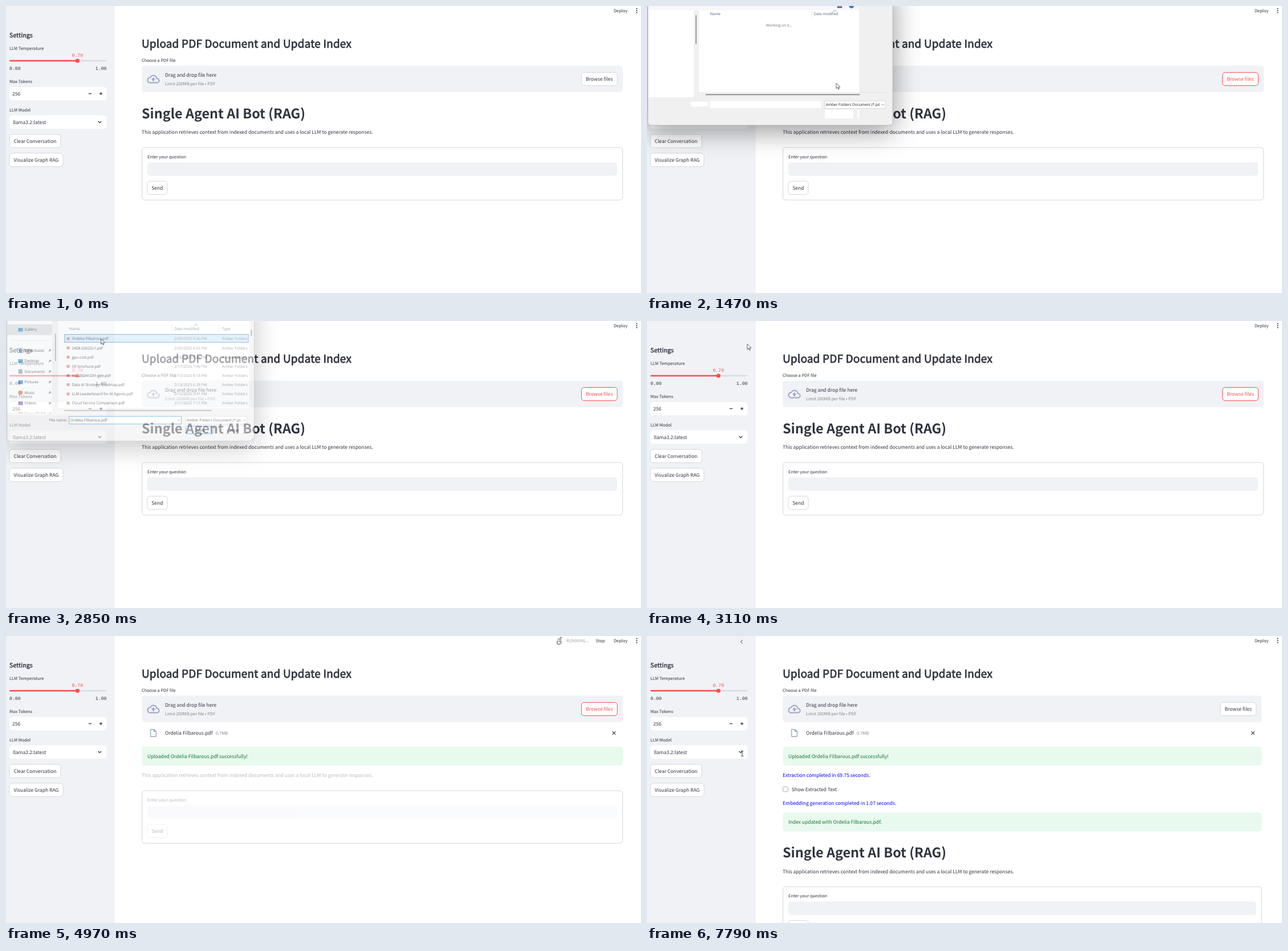
Recreate the animation shown at these times as an HTML page. Size 1114 px wide and 503 px high, loop 8 s.

```html
<!DOCTYPE html>
<html lang="en">
<head>
<meta charset="utf-8">
<title>Single Agent AI Bot</title>
<style>
html, body { margin: 0; width: 100%; height: 100%; overflow: hidden; background: #fff; }
svg { display: block; width: 1114px; height: 503px; }
text {
  font-family: "Noto Sans CJK JP", "Noto Sans CJK SC", "Noto Sans CJK", "Noto Sans CJK KR", "Open Sans", sans-serif;
  font-size: 8.5px; fill: #31333f; text-rendering: geometricPrecision; white-space: pre;
}
.s { font-size: 7.44px; }
.mid { text-anchor: middle; }
.end { text-anchor: end; }
.dim { fill: #83858d; }
.h1 { font-size: 23.4px; font-weight: 700; }
.h2 { font-size: 19.04px; letter-spacing: .15px; stroke: #31333f; stroke-width: .75px; }
.h3 { font-size: 10.6px; letter-spacing: .1px; stroke: #31333f; stroke-width: .4px; }
.mono { font-family: "Liberation Mono", "Noto Sans Mono", monospace; font-size: 8.23px; }
.panel { fill: #f0f2f6; }
.white { fill: #fff; }
.btn { fill: #fff; stroke: #d6d6d9; stroke-width: 1; }
.ok { fill: #e8f9ee; }
.okText { fill: #177233; }
.blue { fill: #00f; }
.icon { fill: #9aa5bf; }
.line { fill: none; stroke: #31333f; stroke-width: 1.3; }
#dialog text { font-family: "Open Sans", "Noto Sans", sans-serif; font-size: 6.76px; fill: #1b1b1b; }
#dialog .head { fill: #4c607a; }
#dialog .gray { fill: #6d6d6d; }
#frame { fill: #f0f0f0; stroke: #a8a8a8; stroke-width: .7; filter: drop-shadow(0 10px 24px rgba(0, 0, 0, .42)); }
.rule { fill: none; stroke: #dedede; stroke-width: .8; }
.thumb { fill: #858585; }
.field { fill: #fff; stroke: #cfcfcf; stroke-width: .8; }
.focus { stroke: #0078d4; }
.chev { fill: none; stroke: #555; stroke-width: .7; }
</style>
</head>
<body>
<svg viewBox="0 0 1114 503">
  <defs>
    <clipPath id="sideClip"><rect x="-3" y="-40" width="81" height="204"/></clipPath>
    <clipPath id="listClip"><rect x="89" y="-40" width="343" height="195"/></clipPath>
    <clipPath id="typeClip"><rect x="318" y="168" width="100" height="17"/></clipPath>
  </defs>
  <rect class="white" width="1114" height="503"/>

  <!-- sidebar -->
  <rect class="panel" width="190.5" height="503"/>
  <path id="collapse" class="line" style="stroke-width:1" d="M167.5 7l-3 3 3 3"/>
  <text class="h3" x="6" y="54.5">Settings</text>
  <text class="s" x="6" y="77">LLM Temperature</text>
  <text class="mono mid" x="125.3" y="89" style="fill:#ff4b4b">0.70</text>
  <rect x="6" y="94.8" width="170.5" height="2.4" rx="1.2" fill="#d7dbe5"/>
  <rect x="6" y="94.8" width="119" height="2.4" rx="1.2" fill="#ff4b4b"/>
  <circle cx="125.3" cy="96" r="3.6" fill="#ff4b4b"/>
  <text class="mono" x="6" y="112">0.00</text>
  <text class="mono end" x="176.5" y="112">1.00</text>
  <text class="s" x="6" y="135">Max Tokens</text>
  <rect class="white" x="6" y="142" width="170.5" height="23.3" rx="4.7"/>
  <text x="11" y="157">256</text>
  <path class="line" d="M145 153.6h5M164 153.6h5M166.5 151.1v5"/>
  <text class="s" x="6" y="185">LLM Model</text>
  <rect class="white" x="6" y="191.7" width="170.5" height="23.4" rx="4.7"/>
  <text x="12" y="206.8">llama3.2:latest</text>
  <path class="line" d="M161.7 202l2.7 2.7 2.7-2.7"/>
  <rect class="btn" x="6" y="225" width="90" height="23.3" rx="4.7"/>
  <text class="mid" x="51" y="240">Clear Conversation</text>
  <rect class="btn" x="6" y="258" width="94" height="23.3" rx="4.7"/>
  <text class="mid" x="53" y="273.2">Visualize Graph RAG</text>

  <!-- toolbar -->
  <g id="status">
    <g id="runner" transform="translate(964 1)" fill="none" stroke="#7f8390" stroke-width="1.5">
      <path/><circle r="1.5" fill="#7f8390" stroke="none"/>
    </g>
    <text class="s" x="983" y="10.7" style="fill:#a3a4ab">RUNNING...</text>
    <text class="s" x="1034.5" y="10.7">Stop</text>
  </g>
  <text class="s" x="1066" y="10.7">Deploy</text>
  <g fill="#31333f"><circle cx="1106.5" cy="4.5" r="1.1"/><circle cx="1106.5" cy="8" r="1.1"/><circle cx="1106.5" cy="11.5" r="1.1"/></g>

  <!-- uploader -->
  <text class="h2" x="238" y="73">Upload PDF Document and Update Index</text>
  <text class="s" x="238" y="97.8">Choose a PDF file</text>
  <rect class="panel wide" x="238.3" y="104.5" width="843.7" height="46.5" rx="4.7"/>
  <path class="icon" transform="translate(247.5 117) scale(.92)" d="M19.35 10.04A7.49 7.49 0 0 0 12 4C9.11 4 6.6 5.64 5.35 8.04A6 6 0 0 0 0 14c0 3.31 2.69 6 6 6h13c2.76 0 5-2.24 5-5 0-2.64-2.05-4.78-4.65-4.96zM19 18H6c-2.21 0-4-1.79-4-4 0-2.05 1.53-3.76 3.56-3.97l1.07-.11.5-.95A5.47 5.47 0 0 1 12 6c2.62 0 4.88 1.86 5.39 4.43l.3 1.5 1.53.11A2.98 2.98 0 0 1 22 15c0 1.65-1.35 3-3 3zM8 13h2.55v3h2.9v-3H16l-4-4z"/>
  <text x="279" y="124.3">Drag and drop file here</text>
  <text class="s dim" x="279" y="139">Limit 200MB per file • PDF</text>
  <g class="right">
    <rect id="browse" class="btn" x="1009.6" y="116.4" width="62.7" height="23.2" rx="4.7"/>
    <text id="browseText" class="mid" x="1041" y="131.2">Browse files</text>
  </g>
  <g id="fileRow">
    <path class="icon" transform="translate(250.1 161.6) scale(.7)" d="M14 2H6c-1.1 0-2 .9-2 2v16c0 1.1.9 2 2 2h12c1.1 0 2-.9 2-2V8l-6-6zM6 20V4h7v5h5v11H6z"/>
    <text x="279" y="172.8">Ordelia Filbarous.pdf</text>
    <text class="s dim" x="368" y="172.6">0.7MB</text>
    <path class="line right" style="stroke-width:1.1" d="M1063.8 167.2l5.6 5.6M1069.4 167.2l-5.6 5.6"/>
  </g>
  <g id="uploaded">
    <rect class="ok wide" x="238.3" y="194" width="843.7" height="33" rx="4.7"/>
    <text class="okText" x="248" y="214">Uploaded Ordelia Filbarous.pdf successfully!</text>
  </g>
  <g id="results">
    <text class="blue" x="238" y="247.2">Extraction completed in 69.75 seconds.</text>
    <rect class="btn" x="238.7" y="264.3" width="8.6" height="8.6" rx="2" style="stroke:#a9aab0"/>
    <text x="253.7" y="272">Show Extracted Text</text>
    <text class="blue" x="238" y="296">Embedding generation completed in 1.07 seconds.</text>
    <rect class="ok wide" x="238.3" y="309.5" width="843.7" height="33" rx="4.7"/>
    <text class="okText" x="248" y="329.3">Index updated with Ordelia Filbarous.pdf.</text>
  </g>

  <!-- chat form -->
  <g id="chat">
    <text id="title" class="h1" x="238" y="196.6">Single Agent AI Bot (RAG)</text>
    <rect class="btn wide" x="238.5" y="248" width="843.2" height="92" rx="4.7"/>
    <g id="stale">
      <text x="238" y="224">This application retrieves context from indexed documents and uses a local LLM to generate responses.</text>
      <text class="s" x="248" y="266.8">Enter your question</text>
      <rect class="panel wide" x="247.7" y="274" width="824.6" height="23.4" rx="4.7"/>
      <rect class="btn" x="247.8" y="307" width="35.2" height="23.4" rx="4.7"/>
      <text class="mid" x="265.3" y="322">Send</text>
    </g>
  </g>

  <!-- file picker -->
  <g id="dialog">
    <rect id="frame" x="-3" y="-40" width="445" height="254" rx="5"/>
    <g id="loading">
      <rect x="-2" y="-40" width="383" height="45" fill="#f6f7f8"/>
      <path d="M341 -2h9v3h-9z" fill="#5a5f85"/><circle cx="367" cy="-3" r="4.5" fill="#2f7fc4"/>
      <path class="white" d="M-2 5h82.5v158H-2zM90 5h291v149H90zM75 171h31v9H75zM109.5 170h202v13h-202zM318.5 186h52v15.5h-52zM378 186h3v15.5h-3z"/>
      <path class="rule" d="M294.5 5v13M381 154.5h51"/>
      <path class="chev" d="M334 7.5l3-2 3 2"/>
      <rect class="thumb" x="83.7" y="14" width="1.6" height="52"/>
      <rect class="thumb" x="102" y="157.5" width="280" height="1.8"/>
      <text class="head" x="110" y="14.5">Name</text>
      <text class="head" x="298" y="14.5">Date modified</text>
      <text class="gray" x="212" y="35">Working on it...</text>
    </g>
    <g id="listing">
      <path class="white" d="M-2.5 -40H78V164H-2.5zM89 -40h344V155H89z"/>
      <rect x="-2.5" y="4" width="80.5" height="19.5" fill="#d9d9d9"/>
      <path class="rule" d="M3 33h71M293.5 4v16M379.5 4v16"/>
      <path class="chev" d="M334 6.5l3-2 3 2"/>
      <rect class="thumb" x="83.3" y="21" width="1.5" height="49"/>
      <rect class="thumb" x="436" y="14" width="1.8" height="11"/>
      <rect class="thumb" x="100" y="158.5" width="265" height="1.5"/>
      <text class="head" x="109" y="14.3">Name</text>
      <text class="head" x="298" y="14.3">Date modified</text>
      <text class="head" x="384" y="14.3">Type</text>
      <g id="places" clip-path="url(#sideClip)"></g>
      <rect id="mark" x="100.5" y="22.3" width="331" height="14.2"/>
      <g id="files" clip-path="url(#listClip)"></g>
      <text class="end" x="105" y="178.8">File name:</text>
      <rect class="field focus" x="108.7" y="169.7" width="202" height="13.6"/>
      <text id="picked" x="111" y="178.8">Ordelia Filbarous.pdf</text>
      <rect class="field focus" x="319" y="187.3" width="50" height="13.8" rx="2"/>
      <text class="mid" x="344" y="196.8">Open</text>
      <rect class="field" x="378.5" y="187.3" width="50" height="13.8" rx="2"/>
      <text class="mid" x="403.5" y="196.8">Cancel</text>
      <path class="chev" d="M303.5 175.5l2.3 2.3 2.3-2.3M440.5 209l-4 4"/>
    </g>
    <rect class="field" x="318.5" y="169.7" width="110" height="13.6"/>
    <text x="320.5" y="178.8" clip-path="url(#typeClip)">Amber Folders Document (*.pdf)</text>
    <path class="chev" d="M421.7 175.5l2.3 2.3 2.3-2.3"/>
  </g>

  <g id="cursor" stroke="#222" stroke-width=".7" fill="#fff">
    <path id="arrow" d="M0 0V9.5L2.2 7.5 3.7 11 5.2 10.3 3.7 7H6.8Z"/>
    <path id="hand" d="M-1 0c0-1 1.6-1 1.6 0V4l4 .9c1 .3 1 1.2.8 2L4.5 10.5H0L-3 7c-.5-1 .6-1.6 1.2-.9l.8.8Z"/>
    <path id="beam" fill="none" stroke-width=".9" d="M-2 -4.5h1.5l.5.5.5-.5H2M0 -4V4M-2 4.5h1.5l.5-.5.5.5H2"/>
  </g>
</svg>

<script>
const LOOP = 8000;
const $ = id => document.getElementById(id);
const show = (id, on) => { $(id).style.display = on ? "" : "none"; };

// Moments of hard change, in ms
const LISTED = 1650, HOVERED = 2390, PICKED = 2650, FILE_ROW = 3130, UPLOADED = 3330, DONE = 5400, IDLE = 5600;

// Tracks are rows of [time, value, ...]
const OPEN = [[1340, .93, 0], [1470, .965, 1], [1600, 1, 1]];
const CLOSE = [[2720, 1, 1], [2980, .949, .1], [2981, .949, 0]];
const POINTER = [
  [120, 1111, 118], [240, 1085, 121], [400, 1056, 126], [660, 1040, 127], [1000, 1040, 127],
  [1150, 960, 128], [1330, 480, 132], [1470, 332, 135], [1800, 328, 165], [1920, 270, 130],
  [2120, 171, 37], [2389, 171, 37], [2390, 166.7, 31], [3100, 166.7, 31], [3510, 511, 378],
  [3580, 525.5, 406], [3800, 560, 512], [5620, 270, 512], [6120, 160, 206], [6180, 158, 206],
  [6380, 158, 206], [6590, 161, 206], [6790, 163, 206], [6990, 169, 206], [7390, 169, 206],
  [7460, 168.5, 206], [7789, 168.5, 206], [7790, 167, 206]
];

function at(track, t) {
  const i = track.findIndex(row => row[0] > t);
  if (i === 0) return track[0].slice(1);
  if (i < 0) return track[track.length - 1].slice(1);
  const a = track[i - 1], b = track[i], k = (t - a[0]) / (b[0] - a[0]);
  return a.slice(1).map((v, j) => v + (b[j + 1] - v) * k);
}
const ramp = (t, from, to) => Math.min(1, Math.max(0, (t - from) / (to - from)));

const files = [
  ["Ordelia Filbarous.pdf", "2/20/2025 6:36 PM"],
  ["2408.02622v1.pdf", "2/20/2025 6:02 PM"],
  ["gpu cost.pdf", "2/18/2025 7:06 PM"],
  ["OF brochure.pdf", "2/17/2025 7:46 PM"],
  ["tsla-20241231-gen.pdf", "2/13/2025 8:18 PM"],
  ["Data AI Strategy Roadmap.pdf", "2/13/2025 6:28 PM"],
  ["LLM Leaderboard for AI Agents.pdf", "2/13/2025 5:41 PM"],
  ["Cloud Service Comparison.pdf", "2/11/2025 7:17 PM"]
];
$("files").innerHTML = files.map(([name, date], i) => {
  const y = 30 + i * 16.57;
  return `<rect x="104.5" y="${y - 2.5}" width="5" height="5" fill="#d9746a"/>
    <text x="113.5" y="${y + 2.4}">${name}</text>
    <text class="gray" x="298" y="${y + 2.4}">${date}</text>
    <text class="gray" x="384" y="${y + 2.4}">Amber Folders</text>`;
}).join("");

const box = "M-4 -3h8.5v6.5h-8.5z";
const places = [
  ["Gallery", 13.7, "#1580d0", box],
  ["Downloads", 51, "#1b6cb5", "M-.6 -4h1.2v5l2-2 .8.8L0 3.3-3.4 -.2l.8-.8 2 2zM-4 3.5h8v1h-8z"],
  ["Desktop", 70, "#1a86d6", box],
  ["Documents", 89, "#7c93a8", "M-3.5 -4h7v8h-7z"],
  ["Pictures", 108, "#1580d0", box],
  ["Music", 127, "#d9653b", "M-4 0a4 4 0 1 0 8 0a4 4 0 1 0-8 0"],
  ["Videos", 146, "#7d4fb5", box],
  ["ScreenToGif", 165, "#e8b64c", box]
];
const pin = y => `<path transform="translate(74 ${y})" d="M0 -3L3 0 1.5 .4 0 2-.7 1.3-3 3.3-1.3 .7-2 0-.4 -1.5z" fill="#777"/>`;
$("places").innerHTML = places.map(([name, y, color, shape], i) =>
  `<path transform="translate(21 ${y})" d="${shape}" fill="${color}"/>
   <text x="28.5" y="${y + 2.4}">${name}</text>${i ? pin(y) : ""}`
).join("");

// Running figures: head x, head y, body
const poses = [
  [9, 2, "M2.5 7L5 4.8H8.5L10.5 7.5M8 5L6.5 9 9.5 10.5V14M6.5 9L5 11.5H2"],
  [6.5, 2, "M1.5 4.8H11.5M5.7 5V13.5M7.3 5V13.5M7.5 9H5.5"],
  [9, 2, "M11 6L8 5 5.5 7.5 8 9V12M1 11a2 2 0 1 0 4 0a2 2 0 1 0-4 0M9 11a2 2 0 1 0 4 0a2 2 0 1 0-4 0"],
  [9.5, 2, "M4 5.5L6 3.8 9 5 7 8.5H10L9.5 12.5M5.5 7.5a3 3 0 1 0 3 4"],
  [7, 2, "M4 8V6L7 4.7 9 7H11M7 5L6 9 4 13.5M6 9L8.5 10.5V13.5"]
];

const wide = [...document.querySelectorAll(".wide")].map(el => [el, +el.getAttribute("width")]);
const right = document.querySelectorAll(".right");

function drawPage(t) {
  const done = t >= DONE, uploaded = t >= UPLOADED;
  const inset = done ? 3.7 : 0;
  wide.forEach(([el, w]) => el.setAttribute("width", w - inset));
  right.forEach(el => el.setAttribute("transform", `translate(${-inset} 0)`));

  show("fileRow", t >= FILE_ROW);
  show("uploaded", uploaded);
  show("results", done);
  show("title", !uploaded || done);
  const drop = done ? 191.5 : uploaded ? 23.2 : t >= FILE_ROW ? 33.6 : 0;
  $("chat").setAttribute("transform", `translate(0 ${drop})`);
  $("stale").style.opacity = done ? 1 : 1 - .67 * ramp(t, 3550, 4580) ** 2;

  const red = done ? 0 : ramp(t, 340, 540);
  const blend = (from, to) => `rgb(${from.map((v, i) => v + (to[i] - v) * red)})`;
  $("browse").style.stroke = blend([214, 214, 217], [255, 75, 75]);
  $("browseText").style.fill = blend([49, 51, 63], [255, 75, 75]);

  show("status", t >= FILE_ROW && t < IDLE);
  $("status").style.opacity = ramp(t, FILE_ROW, 3500);
  const [x, y, body] = poses[Math.max(0, Math.floor((t - 3370) / 200)) % poses.length];
  const [path, head] = $("runner").children;
  path.setAttribute("d", body);
  head.setAttribute("cx", x);
  head.setAttribute("cy", y);
  show("collapse", t >= 6000);
}

function drawDialog(t) {
  const closing = t >= CLOSE[0][0];
  const [scale, alpha] = at(closing ? CLOSE : OPEN, t);
  const [cx, cy] = closing ? [188, 70] : [129, 71];
  show("dialog", alpha > 0);
  $("dialog").style.opacity = alpha;
  $("dialog").setAttribute("transform", `translate(${cx} ${cy}) scale(${scale}) translate(${-cx} ${-cy})`);
  show("loading", t < LISTED);
  show("listing", t >= LISTED);
  show("mark", t >= HOVERED);
  show("picked", t >= PICKED);
  $("mark").setAttribute("fill", t >= PICKED ? "#cce8ff" : "#e5f3ff");
  $("mark").setAttribute("stroke", t >= PICKED ? "#3f88bd" : "none");
}

function drawPointer(t) {
  const [x, y] = at(POINTER, t);
  show("cursor", t >= POINTER[0][0]);
  $("cursor").setAttribute("transform", `translate(${x} ${y})`);
  const beam = t >= 6120, hand = t < 1050 && x < 1072 && x > 1010;
  show("beam", beam);
  show("hand", hand);
  show("arrow", !beam && !hand);
}

function frame() {
  const t = performance.now() % LOOP;
  drawPage(t);
  drawDialog(t);
  drawPointer(t);
  requestAnimationFrame(frame);
}
frame();
</script>
</body>
</html>
```
